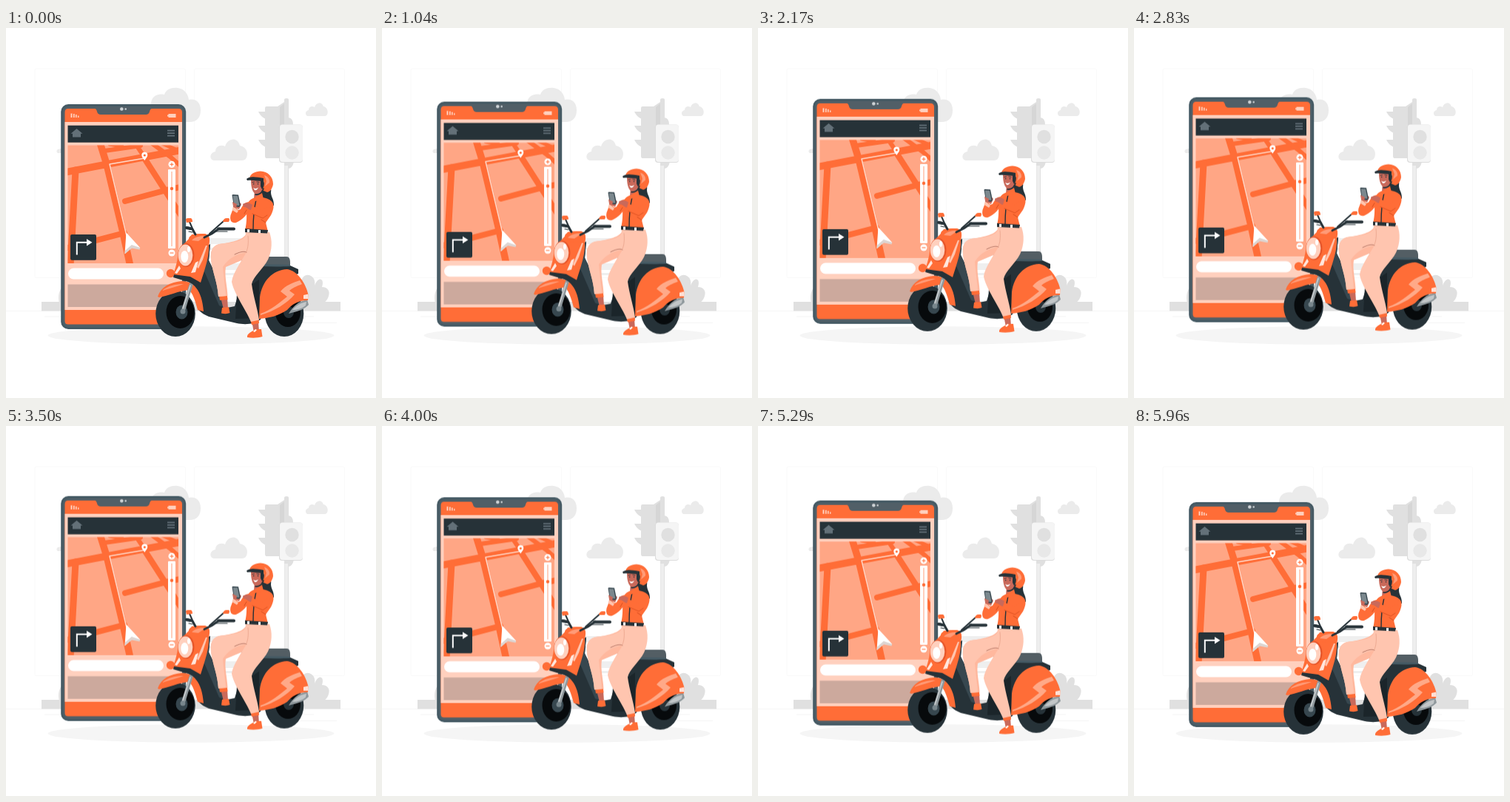
Write an HTML page that moves like this. It is 500 px wide and 500 px high and loops after 6 s.

```html
<!DOCTYPE html>
<html lang="en">
<head>
<meta charset="utf-8">
<title>Scooter navigation</title>
<style>
  html, body { margin: 0; width: 100%; height: 100%; overflow: hidden; background: #fff; }
  svg { display: block; width: 100vw; height: 100vh; }
  .or { fill: #ff6d37; } .dk { fill: #263238; } .md { fill: #455a64; }
  .pale { fill: #ffc5af; } .skin { fill: #c9695a; } .wh { fill: #fff; }
  .g1 { fill: #ebebeb; } .g2 { fill: #e0e0e0; } .g3 { fill: #f5f5f5; }
  .line { fill: none; stroke-linecap: round; stroke-linejoin: round; }
</style>
</head>
<body>
<svg viewBox="0 0 500 500">
  <defs>
    <clipPath id="map"><rect x="83.500" y="158.500" width="149.500" height="159.500"/></clipPath>
  </defs>

  <!-- street -->
  <g fill="none" stroke="#f8f8f8" stroke-width=".8">
    <rect x="39" y="55" width="203.500" height="282.500" rx="2"/>
    <rect x="254.500" y="55" width="203" height="282.500" rx="2"/>
  </g>
  <path stroke="#ebebeb" stroke-width=".5" d="M0 382.400H500M398 398.300H447M403 389.800H416M52 390H76"/>
  <path class="g1" d="M196 103C196 93 204 88 214 90C216 83 224 80 232 81C241 82 246 89 247 97C257 95 263 101 263 111C263 121 258 127 248 127H196Z"/>
  <path class="g1" d="M281 179C274 178 275 168 283 167C283 159 291 157 296 160C299 149 313 146 316 159C324 160 328 168 325 175C324 178 321 179 318 179Z"/>
  <path class="g1" d="M407 119C404 117 404 112 409 111C409 106 414 105 417 107C419 100 427 99 429 106C434 107 436 113 434 117C433 119 431 119 429 119Z"/>
  <path class="g1" d="M75 169H70C67 167 68 163 75 163Z"/>
  <g fill="#efefef">
    <rect x="268" y="284" width="54" height="8" rx="1"/>
    <rect x="258" y="297" width="62" height="3"/>
    <rect x="268" y="318" width="52" height="9"/>
    <rect x="290" y="331" width="40" height="3"/>
  </g>
  <path class="g2" d="M386 372V351C388 343 395 343 399 347C398 337 405 331 412 335C417 338 418 343 417 348C422 335 431 338 427 350C435 350 438 356 436 362C435 367 431 371 428 372Z"/>
  <path class="g2" d="M80 372H72C70 363 71 351 80 348Z"/>
  <rect class="g2" x="48" y="370" width="404" height="12.400"/>

  <!-- traffic light -->
  <path class="g2" d="M376 370V97Q376 95 379 95Q382 95 382 97V370Z"/>
  <path fill="#eee" d="M376.500 370V186H381V370Z"/>
  <path class="g2" d="M350 108Q350 106 352 106H367L376 100V176H352Q350 176 350 173Z"/>
  <path fill="#d6d6d6" d="M370 107L376 102V176H370Z"/>
  <path class="g2" d="M341 113H351V123Q344 120 341 113ZM341 132H351V142Q344 139 341 132ZM341 151H351V161Q344 158 341 151Z"/>
  <path class="g2" d="M380 121Q388 120 388 131H382ZM381 181H389Q387 190 381 190Z"/>
  <rect x="369" y="130.500" width="32" height="51.500" rx="4" fill="#dcdcdc"/>
  <rect x="370" y="130.500" width="31" height="50.500" rx="4" class="g3"/>
  <circle cx="386.500" cy="147" r="9.200" class="g2"/>
  <circle cx="386.500" cy="168.500" r="9.200" fill="#e8e8e8"/>

  <ellipse class="g3" cx="250" cy="415.500" rx="193.500" ry="12.300"/>

  <g id="float">
    <!-- phone -->
    <rect class="md" x="74.200" y="103" width="169" height="304" rx="10"/>
    <rect x="77" y="106" width="163.500" height="298" rx="8" fill="#515f67"/>
    <path class="or" d="M84 109H120Q122 109 123 113Q124 117 128 117H189Q193 117 194 113Q195 109 197 109H233Q238 109 238 114V396Q238 400.500 233 400.500H84Q79.500 400.500 79.500 396V114Q79.500 109 84 109Z"/>
    <circle cx="156.300" cy="109.500" r="2.300" fill="#cfd4d7"/>
    <circle cx="161.700" cy="109.500" r="1.300" fill="#cfd4d7"/>
    <path fill="#ffd0be" d="M87.500 115.500h2v5.500h-2zM91 116h1.700v5H91zM94 117h1.600v4H94zM97 118.500h1.500v2.500H97zM219.500 116h10v5h-10zM218 117.500h1.500v2H218z"/>
    <rect x="79.500" y="127" width="158.500" height="254" fill="#ffd0be"/>
    <rect class="dk" x="83.500" y="131.700" width="149.500" height="23"/>
    <path fill="#637078" d="M95.500 136L103.500 142.700H101V147.500H90V142.700H87.500Z"/>
    <path stroke="#637078" stroke-width="1.700" d="M218 138.700H228M218 142.200H228M218 145.700H228"/>
    <rect x="83.500" y="158.500" width="149.500" height="159.500" fill="#ffa685"/>
    <g clip-path="url(#map)">
      <g class="line" stroke="#ff6d37">
        <path stroke-width="9.500" d="M80 195L137 184L238 165M127 155L136 184L157 272L168 322"/>
        <path stroke-width="9" d="M94 192L87 322"/>
        <path stroke-width="8" d="M80 298L160 277M161 234L217 219L240 214M187 176L214 218L238 256"/>
        <path stroke-width="6" d="M174 155L188 176M196 155L222 174L240 190M133 166L182 159"/>
        <path stroke-width="5" d="M140 157L157 160M209 155L238 168"/>
      </g>
      <path class="line" stroke="#ffd9ca" stroke-width="1.500" d="M187 176L140 184L164 285"/>
    </g>
    <path class="wh" d="M187.300 179C185.500 176 183.300 174.500 183.300 171.800A4 4 0 0 1 191.300 171.800C191.300 174.500 189 176 187.300 179Z"/>
    <circle class="or" cx="187.300" cy="172" r="1.600"/>
    <path class="wh" d="M162.500 276.500L181.300 297L170 296.500L160.500 305Z"/>
    <path fill="#ddd5d2" d="M160.800 301L169.800 293L181.300 297L180.500 299.500L170 297.500L160.500 305.500Z"/>
    <rect class="wh" x="219" y="191" width="10" height="107" rx="1"/>
    <path stroke="#ffbba2" stroke-width="1.400" d="M224 194V295"/>
    <circle class="or" cx="224" cy="217" r="2.200"/>
    <circle class="wh" cx="224" cy="184.300" r="4.500"/>
    <circle class="wh" cx="224" cy="304" r="4.500"/>
    <path stroke="#ff6d37" d="M221.500 184.300H226.500M224 181.800V186.800M221.500 304H226.500"/>
    <rect class="dk" x="87" y="279" width="35" height="34.700" rx="2"/>
    <path fill="none" stroke="#fff" stroke-width="2" d="M95.800 306.500V289.800H111"/>
    <path class="wh" d="M109 285L116.500 289.800L109 294.600Z"/>
    <rect class="wh" x="84" y="324.500" width="129" height="15" rx="7.500"/>
    <circle class="or" cx="222.500" cy="331.500" r="5.700"/>
    <rect x="83.500" y="346.500" width="148" height="30.500" fill="#cca99d"/>

    <!-- rear wheel -->
    <ellipse class="dk" cx="376" cy="386" rx="26.300" ry="31"/>
    <ellipse cx="381" cy="384" rx="17" ry="20" fill="#070a0c"/>
    <ellipse class="dk" cx="382" cy="384" rx="7" ry="8"/>
    <path fill="#8f989c" d="M382 386C389 374 397 369 407 367L409 374C404 380 394 383 382 386Z"/>
    <path fill="#c2c6c8" d="M387 381C393 374 400 371 406 370L405 375C400 379 394 381 387 381Z"/>

    <!-- chassis and seat -->
    <path class="dk" d="M316 319L384 321L395 326V332L360 345L344 394C335 401 322 401 312 399L274 390C262 385 258 380 257 370L249 348L268 296L276 292L274 314L291 348L299 378L309 376L317 350Z"/>
    <path fill="#37474f" d="M276 292L274 314L288 347L296 378L288 375L265 322Z"/>
    <path fill="#1b252a" d="M312 360L342 340V392L310 393Z"/>
    <path fill="#535e64" d="M318 314C319 309 325 309 331 309H379C383 309 384.500 312 384 321C374 323 350 321 318 320Z"/>
    <path class="md" d="M318 318C340 320 365 319 384 320V322C365 323 340 322 318 321Z"/>
    <path class="or" d="M342 393L343 364C346 342 360 327 380 326C394 328 405 345 408.500 360L408 368C394 368 386 374 380 381C368 389 356 392 342 393Z"/>
    <path fill="#ffa988" d="M344 386C358 381 370 371 380 363L371 356C377 348 388 344 397 341L400 346C392 349 386 352 383 355L390 360C380 372 362 383 344 388Z"/>
    <path fill="#ffe0d5" d="M402 361L408.500 359.500V366L402 366Z"/>

    <!-- front wheel -->
    <ellipse class="dk" cx="229" cy="386" rx="26.800" ry="31"/>
    <ellipse cx="235.500" cy="384" rx="19" ry="22" fill="#070a0c"/>
    <ellipse cx="237.500" cy="384" rx="8" ry="9.500" fill="#37474f"/>
    <path class="or" d="M205 363C209 350 222 343 238 342C253 342 265 354 267 383L259 381C255 366 252 358 247 354C234 355 219 362 207 364Z"/>
    <path fill="#ff9b77" d="M211 355C219 348 229 346 240 346C232 349 221 352 211 355Z"/>
    <path class="line" stroke="#8f989c" stroke-width="5" d="M250 347L240 380"/>
    <path class="line" stroke="#c7cbcd" stroke-width="1.800" d="M249 348L239 379"/>
    <circle fill="#78868c" cx="239" cy="383" r="3.500"/>

    <!-- front shield -->
    <path class="dk" d="M228 330L262 333L260 350L246 343L226 337Z"/>
    <path class="or" d="M226 333C229 325 232 314 233 302C236 293 246 289 251 279L269 278C276 280 276 287 274 294C275 308 269 325 263 344L249 336Z"/>
    <path class="or" d="M247 284C249 279 255 278 267 278C275 279 277 287 273 291C267 295 258 291 249 293Z"/>
    <path fill="#ff9b77" d="M251 287C256 281 265 281 270 281L260 288Z"/>
    <path fill="#ffc5af" d="M258 323L270 294L272 294L266 313L260 325Z"/>
    <path fill="#ffe7de" d="M250 331L256 317L260 315L256 330ZM228 331L234 321L236 325L231 332Z"/>
    <ellipse cx="243.500" cy="307" rx="11" ry="16" fill="#e7562a"/>
    <ellipse cx="242.500" cy="307" rx="9.800" ry="14.500" fill="#ffd0be"/>
    <ellipse class="wh" cx="241.300" cy="309" rx="5" ry="8"/>
    <ellipse class="wh" cx="247" cy="299" rx="2" ry="4"/>

    <!-- handlebars -->
    <g class="line" stroke="#263238">
      <path stroke-width="2" d="M248 262L252 271L255 278M275 278L294 261"/>
      <path stroke-width="3" d="M246 270L252 272L256 279M268 283L278 278L288 271"/>
      <path stroke-width="4" d="M287 271.500L308 271.500M244 270L249 271"/>
      <path stroke-width="1.200" d="M283 275L299 275M247 275L252 276"/>
    </g>
    <path class="or" d="M243 259Q243 257 246 257H250Q252 258 252 262L244 263ZM293 262Q294 257 298 257H301Q303 258 301 262Z"/>

    <!-- rider legs -->
    <path class="skin" d="M290 364H299L300 379L294 380ZM332 396L341 396L342 411L335 411Z"/>
    <path class="or" d="M288 362L299 361.500L299.500 367L289 368ZM330.500 395.500L341.500 393L342 399L332 401ZM292 378C295 377 299 378 301 377L302.500 385Q298 387 291 385.500ZM326 416C328 411 334 410 337 407L345 407L346.500 417C340 419 332 419 326 418Z"/>
    <path class="wh" d="M334 410L337 407L339 408L336 411Z"/>
    <path fill="#ffb89e" d="M324 279C319 287 303 290 288 292C278 295 276 303 277 313C279 330 286 344 287 363L299.500 362C299 348 295 336 297 323L330 309Z"/>
    <path class="pale" d="M323.500 276H356C360 287 360 300 354 313C348 325 334 336 332 346C334 362 340 380 342 394.500L331 397C324 380 308 359 305 343C306 332 318 315 325 303C311 305 300 312 293 323L297 362L287 363C286 344 279 330 277 313C276 301 279 294 288 292C303 290 321 289 324 280Z"/>
    <path class="line" stroke="#b97968" d="M325 303C321 301 315 303 309 306"/>
    <path class="line" stroke="#e9a48c" stroke-width=".8" d="M327 281C328 290 327 297 325 302"/>

    <!-- rider body -->
    <path class="dk" d="M344 209C352 207 360 214 358 222C358 229 362 230 362 240C355 239 348 232 343 234Z"/>
    <path class="skin" d="M336 217L345 216L346 231L335 232Z"/>
    <path class="or" d="M334 230C341 227 350 229 356 232C363 236 363 243 358 253L351 263L354 275L323 273C326 262 325 251 325 241C327 234 330 232 334 230Z"/>
    <path class="or" d="M330 236C325 233 320 239 317 245L314 246L308 241L303.500 253C302 261 305 264 311 263C319 260 326 251 329 247Z"/>
    <path class="pale" d="M307 241L314 247L312 250L305.500 246Z"/>
    <path class="dk" d="M323 271L354 273L353 277.500L323 276Z"/>
    <path class="wh" d="M326 272H329V276H326ZM341 273H344V277H341Z"/>
    <path class="line" stroke="#263238" stroke-width="1.400" d="M338 232C335 245 334 258 334 272"/>
    <path class="line" stroke="#d94f20" d="M354 243L347 253L337 250M325 246L322 251M351 263L345 259"/>
    <path class="line" stroke="#ff6d37" stroke-width="10" d="M354 247L347 252L333 246"/>
    <path class="line" stroke="#d94f20" stroke-width=".8" d="M333 251L347 257L353 253"/>
    <path class="skin" d="M320 238C324 235 330 236 333 239L331 246C327 246 325 241 321 242ZM307 237C310 233 316 235 318 238L315 245L307 242Z"/>
    <path fill="#37474f" d="M305.500 226Q305.500 225 307 225L314 225.500L317 240L315 242L308 241Z"/>
    <path fill="#7b888e" d="M306.500 226.500L313 227L315.500 240L308.500 239.500Z"/>
    <path class="skin" d="M306 235L312 238L311 243L307 241Z"/>
    <path class="or" d="M335 230L346 223L348 231L337 234Z"/>

    <!-- head -->
    <path class="skin" d="M331 204H346L348 215C345 222 341 225 337 224C332 221 331 213 331 204Z"/>
    <path class="dk" d="M344 206L348 205L350 214L347 220L344 214Z"/>
    <path class="or" d="M329 203C330 197 337 193.500 344 193.500C354 194 361 201 361 211C360 217 357 221 353 222L346 219C349 214 350 209 347 204Z"/>
    <path fill="#ff9b77" d="M349 199C353 200 357 204 356 209L350 214L352 207Z"/>
    <path class="dk" d="M325 204C329 200 337 201 348 203L348 207C340 207 333 205 326 206Z"/>
    <path class="line" stroke="#263238" stroke-width="1.600" d="M348 217C347 222 342 226 337 225"/>
    <path class="line" stroke="#263238" stroke-width=".8" d="M333 208.500L335.500 208M339 208L342 208.500"/>
    <circle class="dk" cx="334.700" cy="210.700" r=".8"/>
    <circle class="dk" cx="340.500" cy="210.700" r=".8"/>
    <path class="wh" d="M334 216Q338 218 341 215.500Q339 220 336 219Z"/>
  </g>
</svg>
<script>
  // The whole foreground drifts up and back at a constant speed.
  const RISE = 10, LOOP = 6000;
  const steps = [0, -RISE, 0].map(y => ({ transform: `translateY(${y}px)` }));
  document.getElementById('float').animate(steps, { duration: LOOP, iterations: Infinity, easing: 'linear' });
</script>
</body>
</html>
```
